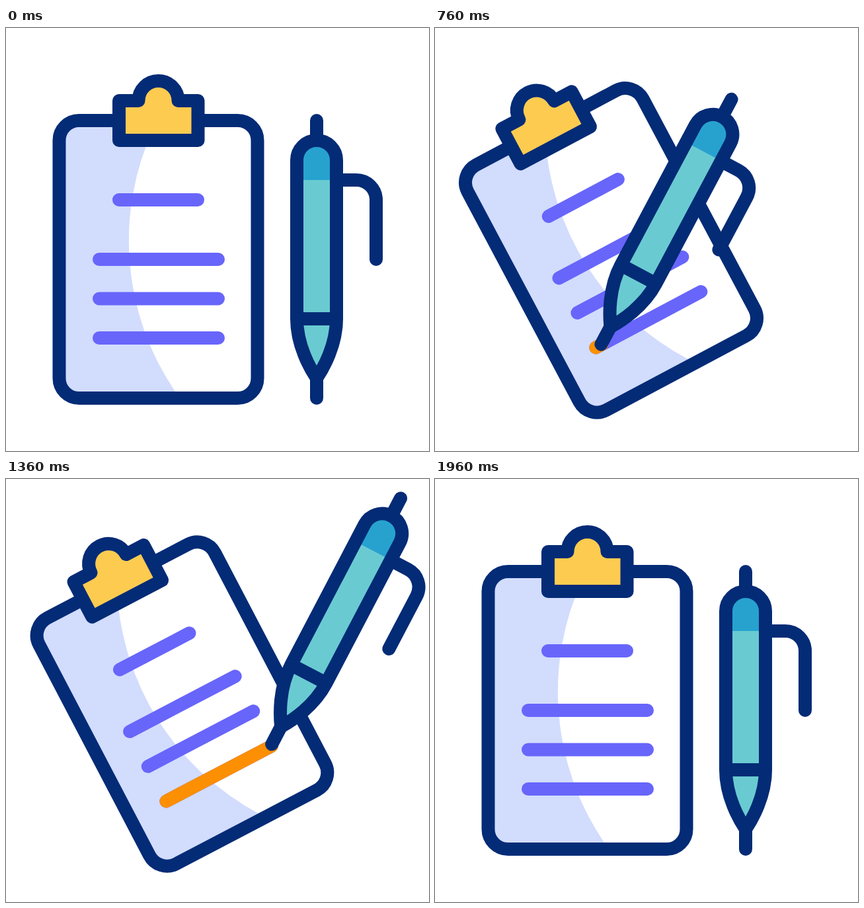
These frames come from a looping animation (640 by 640 pixels, 2 s). An HTML page without scripts:

```html
<!DOCTYPE html>
<html lang="en">
<head>
<meta charset="utf-8">
<title>Clipboard and pen</title>
<style>
  html, body { margin: 0; width: 100%; height: 100%; overflow: hidden; background: #fff; }
  svg { display: block; width: 100vw; height: 100vh; }
  .ink { fill: none; stroke: #042b76; stroke-width: 20; stroke-linecap: round; stroke-linejoin: round; }
  .text { stroke: #6865fb; stroke-width: 20; stroke-linecap: round; }
  .mark { stroke: #ff9000; stroke-width: 20; stroke-linecap: round; stroke-dasharray: 180 400; }
</style>
</head>
<body>
<svg viewBox="0 0 640 640">
  <!-- board: swing out, hold, swing back -->
  <g>
    <animateMotion dur="2s" repeatCount="indefinite" calcMode="spline"
      path="M0 0C14 54 36 62 36 -13.6"
      keyPoints="0;0;1;1;0;0" keyTimes="0;.02;.3;.66;.98;1"
      keySplines="0 0 1 1;.33 .2 .37 .85;0 0 1 1;.33 .14 .47 .9;0 0 1 1"/>
    <g>
      <animateTransform attributeName="transform" type="rotate" dur="2s" repeatCount="indefinite" calcMode="spline"
        values="0 230.5 350;0 230.5 350;-28 230.5 350;-28 230.5 350;0 230.5 350;0 230.5 350"
        keyTimes="0;.02;.3;.66;.98;1"
        keySplines="0 0 1 1;.33 0 .37 1;0 0 1 1;.33 0 .47 1;0 0 1 1"/>
      <rect x="80.5" y="140" width="300" height="420" rx="30" fill="#fff"/>
      <path fill="#d2dcfd" d="M228 140L224 150A406 406 0 0 0 256 550L262 556H110Q84 556 84 530V170Q84 140 110 140Z"/>
      <rect class="ink" x="80.5" y="140" width="300" height="420" rx="30"/>
      <path class="ink" style="fill:#fdcb50" d="M171 110H200.5A30 30 0 0 1 260.5 110H290.5V170H171Z"/>
      <path class="text" d="M171 260H290M141 350H321M141 409.5H321M141 469H321"/>
      <path class="mark" d="M141 469H321" opacity="0" stroke-dashoffset="180">
        <animate attributeName="stroke-dashoffset" dur="2s" repeatCount="indefinite" calcMode="spline"
          values="180;180;0;0" keyTimes="0;.3;.6;1"
          keySplines="0 0 1 1;.72 0 .7 1;0 0 1 1"/>
        <animate attributeName="opacity" dur="2s" repeatCount="indefinite" calcMode="spline"
          values="0;0;1;1;0;0" keyTimes="0;.3;.3001;.66;.98;1"
          keySplines="0 0 1 1;0 0 1 1;0 0 1 1;.33 0 .47 1;0 0 1 1"/>
      </path>
    </g>
  </g>

  <!-- pen: stroke along the line, then straight home -->
  <g>
    <animateTransform attributeName="transform" type="translate" dur="2s" repeatCount="indefinite" calcMode="spline"
      values="0 0;0 0;159 -84.5;159 -84.5;30 -136.5;0 0;0 0"
      keyTimes="0;.3;.6;.66;.66001;.98;1"
      keySplines="0 0 1 1;.72 0 .7 1;0 0 1 1;0 0 1 1;.33 0 .47 1;0 0 1 1"/>
    <!-- arc from rest to the start of the line -->
    <g>
      <animateMotion dur="2s" repeatCount="indefinite" calcMode="spline"
        path="M0 0C0 -95 -52 -98 -129 -52"
        keyPoints="0;0;1;1;0;0" keyTimes="0;.02;.3;.66;.66001;1"
        keySplines="0 0 1 1;.33 0 .37 1;0 0 1 1;0 0 1 1;0 0 1 1"/>
      <g>
        <animateTransform attributeName="transform" type="rotate" dur="2s" repeatCount="indefinite" calcMode="spline"
          values="0 470 350;0 470 350;28 470 350;28 470 350;0 470 350;0 470 350"
          keyTimes="0;.02;.3;.66;.98;1"
          keySplines="0 0 1 1;.33 0 .37 1;0 0 1 1;.33 0 .47 1;0 0 1 1"/>
        <path class="ink" d="M470 140V170M470 530V560M500 230H530A30 30 0 0 1 560 260V350"/>
        <path fill="#69cbd1" d="M440 230H500V440C500 480 480 515 470 530C460 515 440 480 440 440Z"/>
        <path fill="#27a2cf" d="M440 230V200A30 30 0 0 1 500 200V230Z"/>
        <path class="ink" d="M440 440V200A30 30 0 0 1 500 200V440ZC440 480 460 515 470 530C480 515 500 480 500 440"/>
      </g>
    </g>
  </g>
</svg>
</body>
</html>
```
